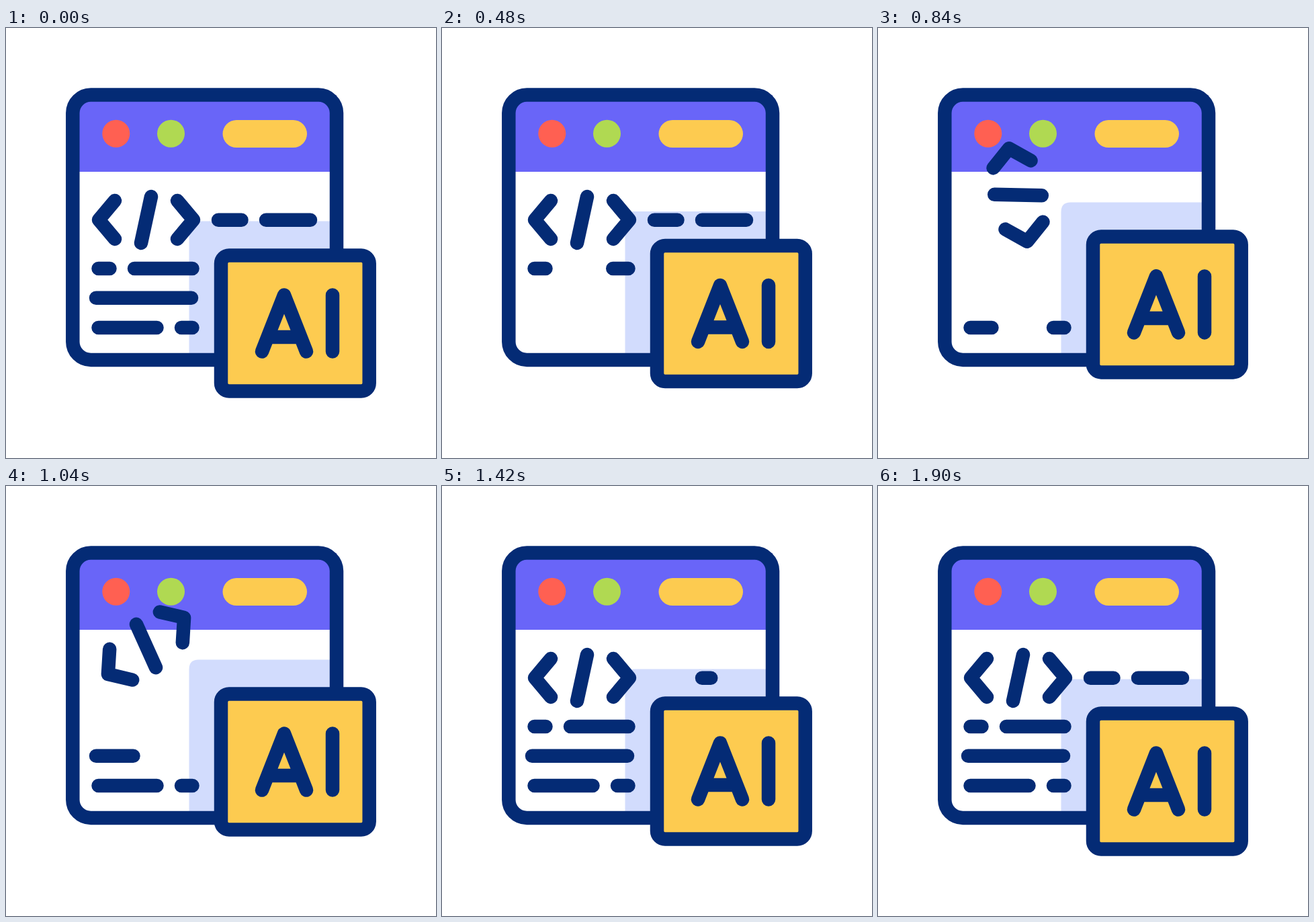
Write an HTML page that moves like this. It is 640 px wide and 640 px high and loops after 1.96 s.

```html
<!DOCTYPE html>
<html lang="en">
<head>
<meta charset="utf-8">
<title>AI code window</title>
<style>
html, body { margin: 0; height: 100%; overflow: hidden; background: #fff; }
svg { display: block; width: 100vw; height: 100vh; }
.line { fill: none; stroke: #042b75; stroke-width: 20.5; stroke-linecap: round; stroke-linejoin: round; }
</style>
</head>
<body>
<svg viewBox="0 0 640 640">
  <path fill="#fff" d="M100 100H492V494H100Z"/>
  <path fill="#6965f8" d="M100 100H492V214H100Z"/>
  <path id="shade" fill="#d2dcfd"/>
  <rect class="line" x="99.3" y="99.5" width="392.7" height="394.5" rx="27"/>
  <circle cx="163.8" cy="157.2" r="20.5" fill="#ff6052"/>
  <circle cx="245.5" cy="157.2" r="20.5" fill="#b0d952"/>
  <rect x="322.5" y="137" width="125.5" height="41" rx="20.5" fill="#fdcb50"/>
  <g id="rows" class="line"></g>
  <g id="code" class="line">
    <path d="M162 257L138 285.5L162 314M255 257L279 285.5L255 314M216 251L201 320"/>
  </g>
  <g id="chip" class="line">
    <rect x="320" y="338.5" width="220.7" height="202" rx="12" fill="#fdcb50"/>
    <path d="M381 481.5L414 397.5L447 481.5M392 460H436M486 397.5V481.5"/>
  </g>
</svg>
<script>
const LOOP = 1960;
const $ = id => document.getElementById(id);

// Rows from bottom to top; the right-hand dash of each row comes first.
const rows = [
  { y: 446, dashes: [[261, 277.5], [137.5, 224.5]] },
  { y: 401.7, dashes: [[134, 276]] },
  { y: 358, dashes: [[191, 277.5], [137.5, 154.5]] },
  { y: 285.7, dashes: [[387, 453], [316, 350.5]] }
];
for (const row of rows) {
  row.path = document.createElementNS("http://www.w3.org/2000/svg", "path");
  row.length = row.dashes.reduce((sum, [a, b]) => sum + b - a, 0);
  $("rows").append(row.path);
}

const ease = (t, from, to) => {
  const u = Math.min(1, Math.max(0, (t - from) / (to - from)));
  return u * u * (3 - 2 * u);
};

// Keeps only the part of the row between two fractions of its total length.
function trim(row, start, end) {
  let pos = 0, d = "";
  for (const [a, b] of row.dashes) {
    const from = Math.max(a, a + start * row.length - pos);
    const to = Math.min(b, a + end * row.length - pos);
    if (to > from) d += `M${from} ${row.y}H${to}`;
    pos += b - a;
  }
  row.path.setAttribute("d", d);
}

function draw(t) {
  const lift = -29.3 * (ease(t, 10, 955) - ease(t, 980, 1880));
  $("chip").setAttribute("transform", `translate(0 ${lift})`);
  $("shade").setAttribute("d", `M272.5 490V${301.5 + lift}q0 -14 14 -14H490V490Z`);

  rows.forEach((row, i) => {
    const hide = 136 + 134 * i, show = 740 + 211 * i;
    if (t < 710) trim(row, ease(t, hide, hide + 134), 1);
    else trim(row, 0, ease(t, show, show + 211));
  });

  const jump = -67 * (ease(t, 710, 955) - ease(t, 960, 1187));
  const spin = 360 * ease(t, 720, 1120);
  $("code").setAttribute("transform", `translate(0 ${jump}) rotate(${spin} 208.5 285.5)`);
}

const begin = performance.now();
function tick() {
  draw((performance.now() - begin) % LOOP);
  requestAnimationFrame(tick);
}
tick();
</script>
</body>
</html>
```
